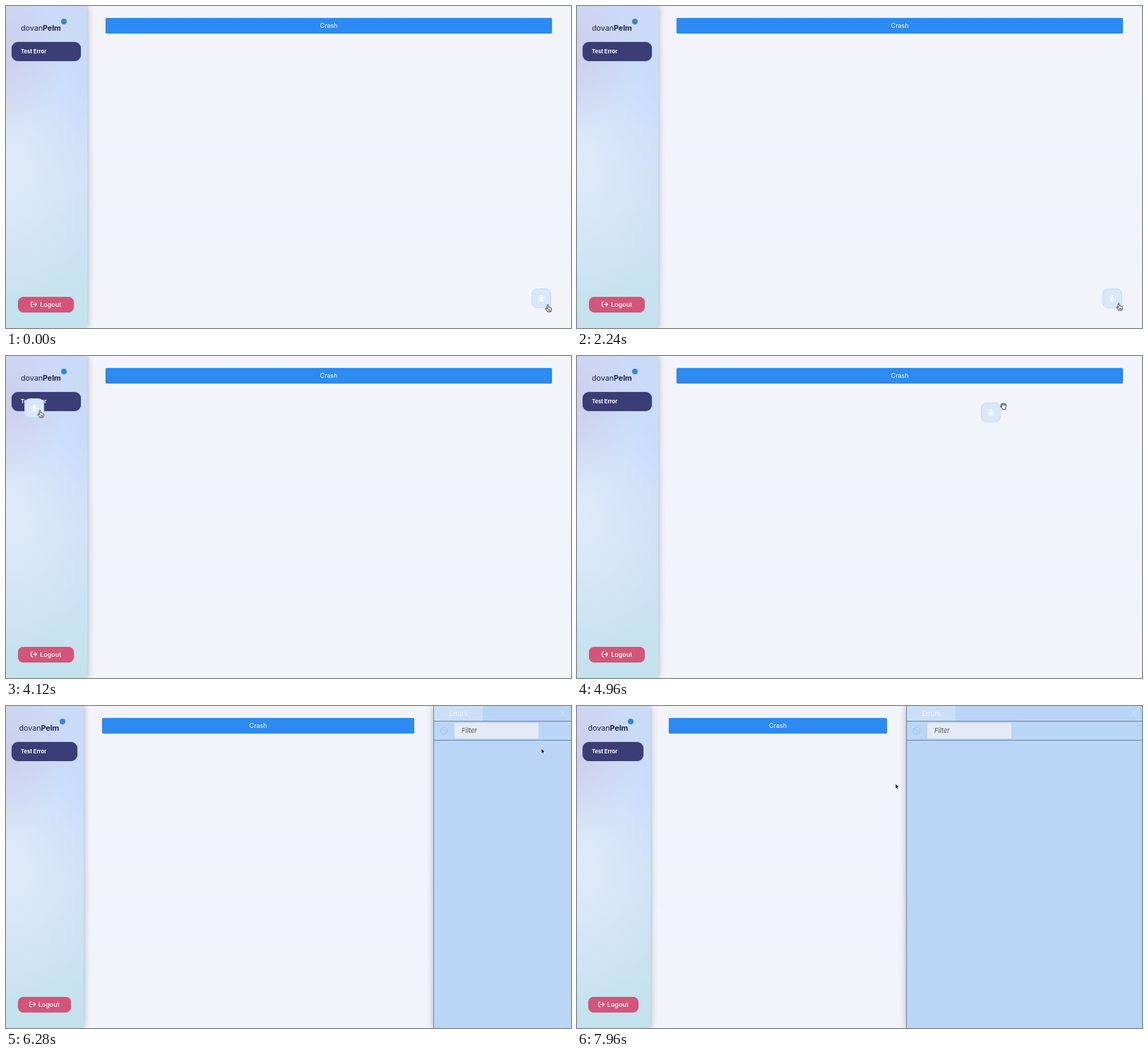
An HTML page that plays this animation: 800 by 456 pixels, repeating every 8 s.

```html
<!DOCTYPE html>
<html lang="en">
<head>
<meta charset="utf-8">
<title>Error panel demo</title>
<style>
  @property --panel { syntax: "<length>"; inherits: true; initial-value: 800px; }

  html, body { margin: 0; width: 100%; height: 100%; overflow: hidden; }
  body { font-family: Inter, "Open Sans", sans-serif; }
  #stage {
    /* The sidebar gives way faster once the panel is open */
    --shift: calc(var(--panel) - 605px);
    --side: calc(110px + min(var(--shift) * .0257, var(--shift) * .0432));
    position: relative; width: 800px; height: 456px; overflow: hidden;
    background: linear-gradient(#f3f4fa, #f1f4f9 27%, #f1f4fc 45%, #f1f3f9 55%, #f1f3fd 65%, #f0f4f9 80%, #f3f4fa);
    animation: resize 8s linear infinite;
  }
  #stage div, #stage svg { position: absolute; box-sizing: border-box; }
  svg { overflow: visible; }

  .sidebar {
    left: 0; top: 0; width: var(--side); height: 456px;
    box-shadow: 0 0 9px rgba(40, 45, 75, .36);
    background:
      radial-gradient(85px 110px at 0 70px, rgba(207, 202, 232, .8), transparent),
      radial-gradient(130px 190px at 5px 225px, rgba(223, 235, 248, .95), transparent),
      linear-gradient(174deg, #cbdbf6, #c8dcfb 30%, #cfe2f7 55%, #cae3f2 78%, #c3e2ec);
  }
  .brand { left: calc(var(--side) / 2 - 36.5px); top: 24px; font-size: 10.7px; line-height: 15px; color: #1c2346; white-space: nowrap; }
  .mark { left: calc(var(--side) / 2 + 20.5px); top: 18px; width: 8px; height: 8px; border-radius: 50%; background: #3684d8; }
  .nav, .logout, .crash { color: #fff; background: var(--fill); box-shadow: 0 0 1px var(--fill); }
  .nav {
    --fill: #3b3d77;
    left: 8px; top: 51px; width: calc(var(--side) - 17.5px); height: 27px; padding-left: 13px;
    border-radius: 9px; font: bold 7.6px/27px Inter, sans-serif;
  }
  .logout {
    --fill: #d4547a;
    left: calc(var(--side) * .152); top: 411.5px; width: calc(var(--side) * .683); height: 22px;
    display: flex; align-items: center; justify-content: center; gap: 4px;
    border-radius: 8px; font-size: 9px; font-weight: 500;
  }
  #stage .logout svg { position: static; }
  .crash {
    --fill: #2c8af1;
    left: calc(var(--side) + 26.3px); top: 17px; height: 22px;
    width: calc(var(--panel) - var(--side) - 53.3px);
    border-radius: 2px; font-size: 9px; line-height: 22px; text-align: center;
  }

  .panel {
    left: var(--panel); top: 0; right: 0; height: 456px;
    background: #b9d6f7; border-left: 1px solid #6f839d; box-shadow: 0 0 9px rgba(40, 45, 75, .3);
    animation: open 8s step-end infinite;
  }
  .tab { left: 0; top: 0; width: 69px; height: 21px; background: #cbe0f8; color: #f3f8fe; font-size: 9.2px; line-height: 21px; text-align: center; }
  .rule { left: 0; right: 0; height: 1px; background: #6f839d; }
  .filter { left: 29px; top: 24px; width: 119px; height: 22px; padding-left: 10px; border-radius: 2px; background: #e5eaf5; color: #4b4f59; font-size: 9.2px; line-height: 22px; font-style: italic; }

  .bug {
    left: -14px; top: -14px; width: 28px; height: 28px;
    border: 1px solid #bfdbf5; border-radius: 8px; background: #d7e8f9;
    animation: drag 8s linear infinite, close 8s step-end infinite;
  }
  .cursor { left: 0; top: 0; width: 1px; height: 1px; animation: point 8s ease-in-out infinite; }
  .cursor g { fill: #fff; stroke: #222; stroke-width: .9; stroke-linejoin: round; stroke-linecap: round; }
  .cursor .hand { animation: hand 8s step-end infinite; }
  .cursor .fist { animation: fist 8s step-end infinite; }
  .cursor .arrow { fill: #000; stroke: #fff; stroke-width: .7; animation: open 8s step-end infinite; }

  @keyframes resize {
    0%, 75.49% { --panel: 800px; }
    75.5%, 94.5% { --panel: 605px; }
    99.5% { --panel: 466px; }
    100% { --panel: 455px; }
  }
  @keyframes open { 0% { opacity: 0; } 75.5%, 100% { opacity: 1; } }
  @keyframes close { 0% { opacity: 1; } 75.5%, 100% { opacity: 0; } }
  @keyframes hand { 0%, 45.75%, 67.5% { opacity: 1; } 30%, 56%, 75.5%, 100% { opacity: 0; } }
  @keyframes fist { 0%, 45.75%, 67.5%, 100% { opacity: 0; } 30%, 56% { opacity: 1; } }
  @keyframes drag {
    0% { transform: translate(758px, 414px); }
    31% { transform: translate(758px, 414px); animation-timing-function: cubic-bezier(.4, 0, .6, .9); }
    36.5% { transform: translate(203px, 122px); animation-timing-function: ease-out; }
    45.5% { transform: translate(40px, 74px); }
    56.25% { transform: translate(40px, 74px); animation-timing-function: cubic-bezier(.4, 0, .7, .76); }
    62% { transform: translate(585px, 80px); animation-timing-function: cubic-bezier(.3, .39, .6, 1); }
    65%, 100% { transform: translate(758px, 60px); }
  }
  @keyframes point {
    0% { transform: translate(768px, 428px); }
    18%, 28% { transform: translate(768px, 426px); }
    30.75% { transform: translate(758px, 415px); animation-timing-function: cubic-bezier(.4, 0, .6, .9); }
    36.5% { transform: translate(203px, 122.5px); animation-timing-function: ease-out; }
    45.5%, 56% { transform: translate(41px, 75px); }
    48%, 53% { transform: translate(49px, 82px); }
    56% { animation-timing-function: cubic-bezier(.4, 0, .7, .76); }
    62% { transform: translate(603px, 71px); animation-timing-function: cubic-bezier(.3, .39, .6, 1); }
    65%, 84.5% { transform: translate(760px, 64px); }
    91%, 94% { transform: translate(606px, 114px); }
    94% { animation-timing-function: linear; }
    99.5%, 100% { transform: translate(453px, 114px); }
  }
</style>
</head>
<body>
<div id="stage">
  <div class="crash">Crash</div>
  <div class="sidebar">
    <div class="brand">dovan<b>Pelm</b></div>
    <div class="mark"></div>
    <div class="nav">Test Error</div>
    <div class="logout">
      <svg width="9" height="9" fill="none" stroke="#fff" stroke-width="1.1" stroke-linecap="round" stroke-linejoin="round">
        <path d="M3 1H2Q.6 1 .6 2.4V6.6Q.6 8 2 8H3M3.4 4.5H8.4M6.2 2.2 8.5 4.5 6.2 6.8"/>
      </svg>
      <span>Logout</span>
    </div>
  </div>

  <div class="panel">
    <div class="tab">Errors</div>
    <div class="rule" style="top:21px"></div>
    <div class="rule" style="top:48px"></div>
    <svg style="left:8px;top:29px" width="12" height="12" fill="none" stroke="#a9c5e6">
      <circle cx="6" cy="6" r="5"/><path d="M2.5 2.5 9.5 9.5"/>
    </svg>
    <div class="filter">Filter</div>
    <svg style="right:9px;top:7px" width="6" height="7" stroke="#d5e6fa"><path d="M.3.3 5.7 6.7M5.7.3.3 6.7"/></svg>
  </div>

  <div class="bug">
    <svg style="left:7px;top:7px" width="12" height="12" viewBox="-6 -6 12 12" fill="#f7fafe" stroke="#f7fafe" stroke-linecap="round">
      <path d="M-2-3Q-2-5 0-5T2-3Z" stroke="none"/>
      <ellipse cy="1.2" rx="2.6" ry="3.8" stroke="none"/>
      <path d="M-5.3 1H5.3M-4.7-2.8-2-.8M4.7-2.8 2-.8M-4.7 4.8-2 2.8M4.7 4.8 2 2.8"/>
    </svg>
  </div>

  <svg class="cursor">
    <g class="hand">
      <path d="M-1.8 1V-3.8Q-1.7-5-.8-5T.2-3.8V-1.2Q1.2-2 1.7-1Q2.8-1.6 3.1-.5Q4.3-.7 4.3.6V2.5Q4.2 3.8 3.4 5H-1.2Q-1.9 3.6-4 1.2Q-4.4 0-3.2.1Z"/>
      <path d="M0 1.7V3.6M1.2 1.7V3.6M2.4 1.7V3.6" stroke-width=".6"/>
    </g>
    <g class="fist">
      <path d="M-3.1.9-3.6-2.2Q-3.2-3.8-2-3Q-1.4-4.7-.2-3.6Q1-4.7 1.8-3.2Q3.4-3.6 3.7-2Q4.3.8 2.7 2.8V4.5H-1.7V3.3L-4.1.8Q-4.1-.4-3.1.1Z"/>
      <path d="M-1.8-2.5V-1M0-2.8V-1M1.8-2.4V-1"/>
    </g>
    <path class="arrow" d="M-2-4V3.2L-.4 1.8.8 4.3 2 3.7.9 1.3H3Z"/>
  </svg>
</div>
</body>
</html>
```
